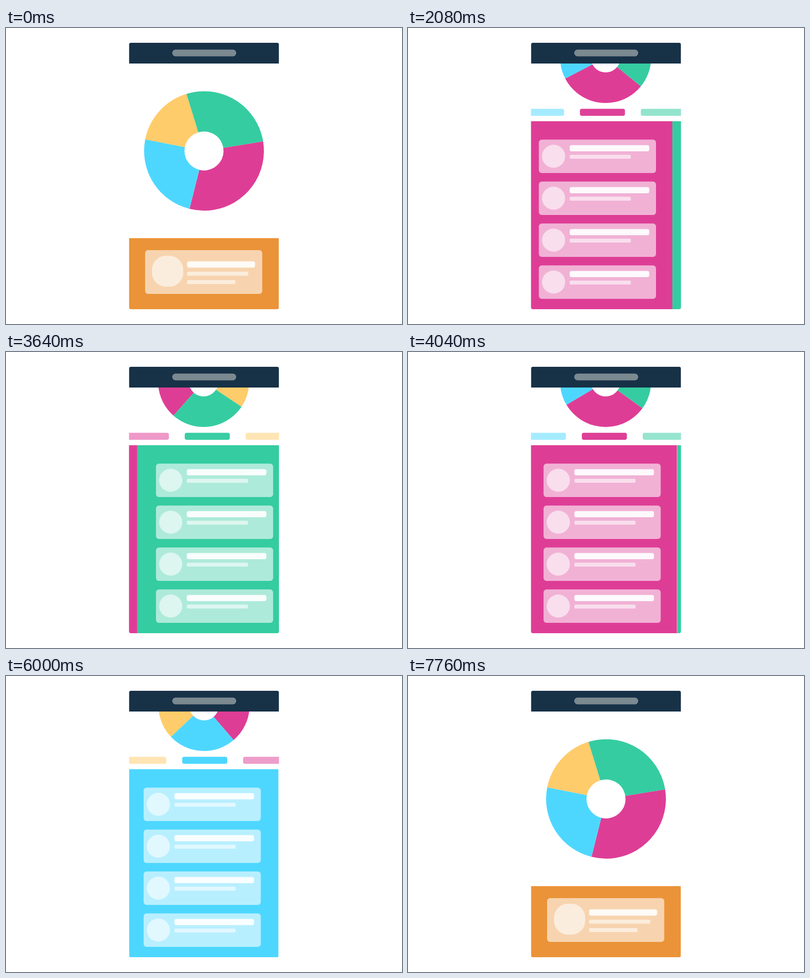
An HTML page with a canvas for the animation above (8000 ms loop, 800x600 px).

```html
<!DOCTYPE html>
<html>
<head>
<meta charset="utf-8">
<style>
html, body { margin: 0; width: 100%; height: 100%; overflow: hidden; background: #fff; }
canvas { display: block; }
</style>
</head>
<body>
<canvas id="stage" width="800" height="600"></canvas>
<script>
const ctx = document.getElementById('stage').getContext('2d');
const LOOP = 8000, STEP = 40;
const LEFT = 248.5, WIDTH = 303, TOP = 72, BOTTOM = 570;
const green = '#35cca1', pink = '#de3d96', blue = '#4dd7ff', yellow = '#ffcc6b';

// Slices of the ring: colour, start and end in degrees
const slices = [
  [pink, -9.2, 104], [blue, 104, 191.2], [yellow, 191.2, 253], [green, 253, 350.8]
];
// Pages: place in the row, colour, card inset, width
const pages = [
  [-2, yellow, 30, 303], [-1, blue, 29.5, 302], [0, pink, 33.3, 303],
  [1, green, 38, 303], [2, yellow, 38, 303]
];

const mix = (a, b, p) => a + (b - a) * p;
const clamp = v => Math.max(0, Math.min(1, v));

// Critically damped spring from 0 to 1
function spring(t, start, speed) {
  const x = Math.max(0, t - start) / 1000 * speed;
  const p = 1 - (1 + x) * Math.exp(-x);
  return p > 0.9985 ? 1 : p;
}

function box(x, y, w, h, r, fill, alpha = 1) {
  ctx.globalAlpha = alpha;
  ctx.fillStyle = fill;
  ctx.beginPath();
  ctx.roundRect(x, y, w, h, r);
  ctx.fill();
  ctx.globalAlpha = 1;
}

const white = (x, y, w, h, r, alpha) => box(x, y, w, h, r, '#fff', alpha);

function drawRing(cx, cy, r, turn) {
  const hole = r * 0.326;
  ctx.lineWidth = r - hole;
  for (const [color, from, to] of slices) {
    ctx.strokeStyle = color;
    ctx.beginPath();
    ctx.arc(cx, cy, (r + hole) / 2, (from + turn) * Math.PI / 180, (to + turn) * Math.PI / 180);
    ctx.stroke();
  }
}

function drawHome() {
  box(LEFT, 426, 302.5, 144, 0, '#eb9338');
  white(281, 450.3, 236.7, 88.7, 6, 0.6);
  white(295, 461.7, 63, 62.6, 28, 0.58);
  white(365.8, 473, 137.4, 12.8, 4, 0.88);
  white(365.8, 494, 123.6, 8, 2, 0.58);
  white(365.8, 511, 97.7, 8, 2, 0.58);
}

function drawCard(x, y) {
  white(x, y, 236.7, 67.8, 6, 0.6);
  white(x + 6.4, y + 10.4, 46.8, 46.8, 23.4, 0.58);
  white(x + 62.3, y + 11.3, 160.8, 12.6, 4, 0.92);
  white(x + 62.3, y + 30.7, 123.6, 8, 2.5, 0.58);
}

function drawPages(current, top) {
  for (const [place, color, inset, width] of pages) {
    const x = LEFT + WIDTH * (place - current);
    if (Math.abs(place - current) >= 1) continue;
    ctx.save();
    ctx.beginPath();
    ctx.rect(x, top, width, BOTTOM - top);
    ctx.clip();
    box(x, top, width, 400, 0, color);
    for (let i = 0; i < 4; i++) drawCard(x + inset, top + 37.2 + 85 * i);
    ctx.restore();
  }
}

function drawTabs(current, alpha) {
  const base = 354.4 + 1.6 * Math.max(0, -current);
  for (const [place, color] of pages) {
    const away = place - current;
    box(base + 123 * away, 163.8, 91, 14.3, 4, color, alpha * (1 - 0.5 * clamp(Math.abs(away))));
  }
}

function draw(t) {
  const current = spring(t, 2050, 12.85) - spring(t, 3611, 12.85) - spring(t, 5215, 12.85);
  const back = spring(t, 7378, 24);
  const lift = spring(t, 966, 19) - back;
  const rise = spring(t, 1091, 19) - back;
  const turn = lift * (42.5 + current * (current > 0 ? 103.8 : 97.1));

  ctx.clearRect(0, 0, 800, 600);
  ctx.save();
  ctx.beginPath();
  ctx.roundRect(LEFT, 30, WIDTH, 540, 4);
  ctx.clip();

  drawRing(400 - 0.8 * lift * (1 + Math.min(0, current)), mix(249.2, 60, lift), mix(121, 92, lift), turn);
  if (rise < 1) drawHome();
  if (rise > 0) {
    drawPages(current, mix(BOTTOM, 189, rise));
    drawTabs(current, clamp(rise * 10 - 9));
  }
  box(LEFT, 30, WIDTH, TOP - 30, 0, '#173147');
  box(335.8, 43.8, 129.3, 13.6, 6.8, '#7b8990');
  ctx.restore();
}

const begin = performance.now();
function tick() {
  const t = (performance.now() - begin) % LOOP;
  draw(Math.floor(t / STEP) * STEP);
  requestAnimationFrame(tick);
}
tick();
</script>
</body>
</html>
```
